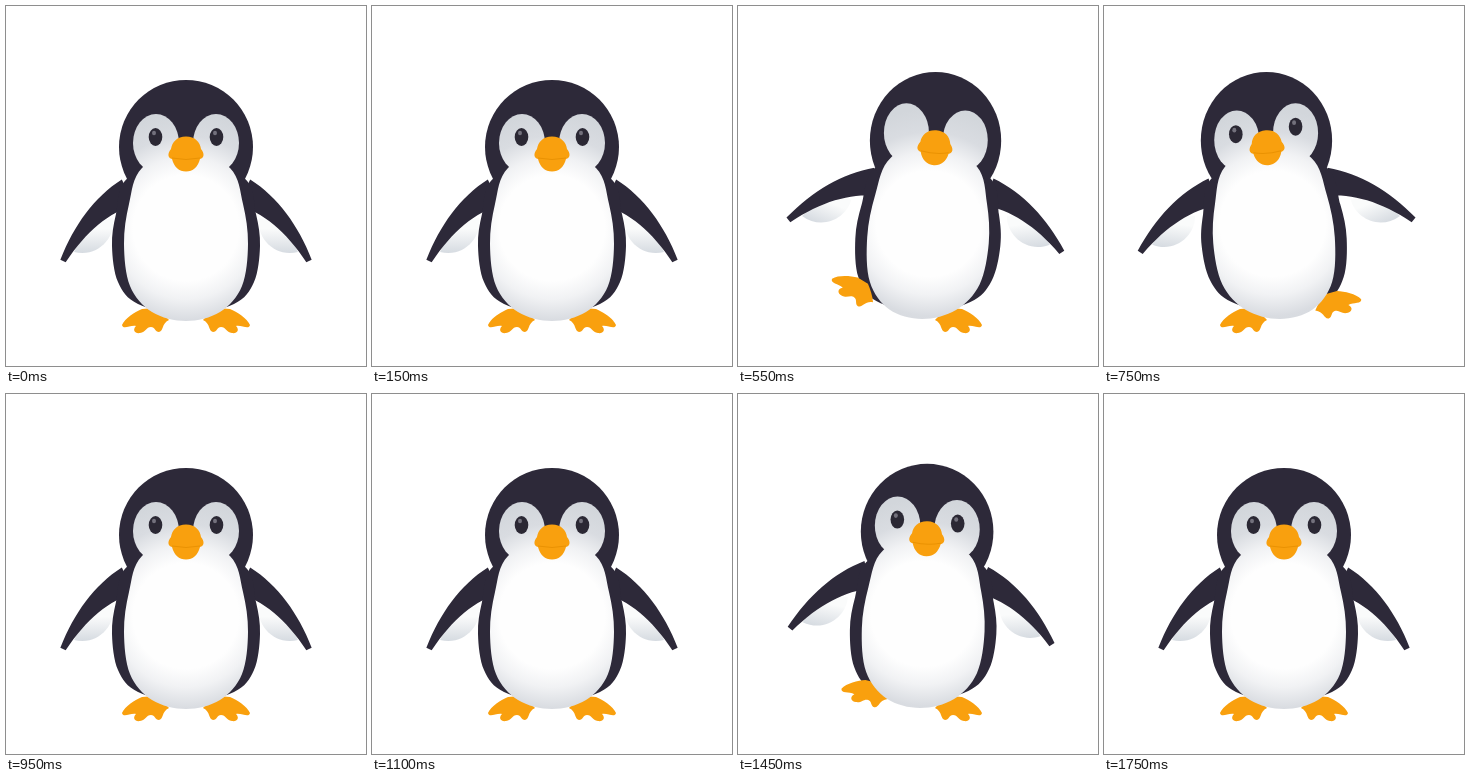
An HTML page for the animation above (1.8 s loop, 360 px wide and 360 px high).

```html
<!DOCTYPE html>
<html lang="en">
<head>
<meta charset="utf-8">
<title>Waddling penguin</title>
<style>
  html, body { margin: 0; width: 100%; height: 100%; overflow: hidden; background: #fff; }
  svg { display: block; width: 100vw; height: 100vh; }
</style>
</head>
<body>
<svg viewBox="0 0 360 360">
  <defs>
    <radialGradient id="chest" gradientUnits="userSpaceOnUse" r="115">
      <stop offset=".46" stop-color="#fefefe"/>
      <stop offset=".62" stop-color="#f1f2f4"/>
      <stop offset=".8" stop-color="#d9dce1"/>
      <stop offset="1" stop-color="#d2d6db"/>
    </radialGradient>
    <linearGradient id="lining" x1="0" y1="0" x2="0" y2="1">
      <stop offset=".3" stop-color="#fafbfb"/>
      <stop offset="1" stop-color="#d6dbe1"/>
    </linearGradient>
  </defs>
  <g id="scene"></g>
</svg>
<script>
const LOOP = 1800, STEP = 50, MID = 180, GROUND = 315;
const DARK = '#2d2939', ORANGE = '#f9a00e';
const SIDES = [1, -1]; // left, right

// Left halves of the symmetric outlines, from top to bottom.
const TORSO = [[180, 150], [122, 172], [110, 208], [106, 240], [112, 276], [132, 298], [180, 309]];
const BELLY = [[180, 140], [136, 162], [123, 198], [118, 238], [124, 280], [146, 306], [180, 315]];

const scene = document.getElementById('scene');
const chest = document.getElementById('chest');

function set(el, attrs) {
  for (const name in attrs) el.setAttribute(name, attrs[name]);
  return el;
}
function add(tag, attrs, parent = scene) {
  const el = document.createElementNS('http://www.w3.org/2000/svg', tag);
  parent.append(el);
  return set(el, attrs);
}
const both = make => SIDES.map(make);

// A tapering band along a quadratic spine that starts at the shoulder.
function wingPath() {
  const top = [], under = [];
  for (let i = 0; i <= 16; i++) {
    const u = i / 16, v = 1 - u;
    const x = -79 * u * v - 65 * u * u, y = 39 * u * v + 69 * u * u;
    const dx = -79 * (v - u) - 130 * u, dy = 39 * (v - u) + 138 * u;
    const w = (14 - 11 * u) / Math.hypot(dx, dy);
    top.push([x + dy * -w, y + dx * w]);
    under.unshift([x + dy * w, y - dx * w]);
  }
  return `M${top.concat(under).join('L')}Z`;
}

const linings = both(() => add('path', {
  d: 'M-15 26C-12 45-30 66-54 60Q-40 28-15 26Z', fill: 'url(#lining)' }));
const wings = both(() => add('path', { d: wingPath(), fill: DARK }));
const torso = add('path', { fill: DARK });
const head = add('ellipse', { fill: DARK });
const feet = both(() => add('path', {
  d: 'M-3-12C-10-9-20-3-23 4C-22 9-15 4-9 5C-13 9-10 13-5 12C1 11 1 6 6 6C10 6 10 11 14 11C19 10 16 3 24-1C20-6 14-10 9-13Z',
  fill: ORANGE }));
const lobes = both(() => add('ellipse', { fill: 'url(#chest)' }));
const belly = add('path', { fill: 'url(#chest)' });
const eyes = both(() => {
  const g = add('g', {});
  add('ellipse', { rx: 6.8, ry: 9, fill: '#2b2834' }, g);
  add('ellipse', { cx: -1.5, cy: -4, rx: 2, ry: 2.3, fill: '#73717c' }, g);
  return g;
});
const beak = add('g', {});
add('path', {
  d: 'M0-17.5C9-17.5 14-12 15-5C19 0 18 4 14 5C12 13 7 17.5 0 17.5C-7 17.5-12 13-14 5C-18 4-19 0-15-5C-14-12-9-17.5 0-17.5Z',
  fill: ORANGE }, beak);
add('path', { d: 'M-14 4Q0 7 14 4', fill: 'none', stroke: '#ea9203' }, beak);

// Closed smooth curve through a half outline and its mirror image.
function outline(half, warp) {
  const twin = half.slice(1, -1).reverse().map(([x, y]) => [2 * MID - x, y]);
  const pts = half.concat(twin).map(p => warp(...p));
  const at = i => pts[(i + pts.length) % pts.length];
  const handle = (i, dir) => at(i).map((v, k) => v + dir * (at(i + 1)[k] - at(i - 1)[k]) / 6);
  return `M${pts[0]}` + pts.map((_, i) =>
    `C${handle(i, 1)} ${handle(i + 1, -1)} ${at(i + 1)}`).join('') + 'Z';
}

// Smooth rise and fall around a moment.
function bump(t, center, reach) {
  const d = Math.abs(t - center) / reach;
  return d < 1 ? Math.cos(d * Math.PI / 2) ** 2 : 0;
}

function draw(t) {
  const lean = bump(t, 550, 150) - bump(t, 750, 190) + 0.52 * bump(t, 1450, 200);
  const crouch = 0.5 * bump(t, 450, 100) + bump(t, 1250, 120);
  const open = 1 - bump(t, 550, 100);
  const size = Math.abs(lean);
  const sx = 1 - 0.02 * size + 0.03 * crouch;
  const sy = 1 + 0.025 * size - 0.021 * crouch;

  // Higher parts sway and tilt more.
  const warp = (x, y) => {
    const h = (GROUND - y) / 180;
    return [
      MID + (x - MID) * sx + lean * (4 + 14 * h) - 2 * crouch * h,
      GROUND - 2 * size - (GROUND - y) * sy + lean * 0.12 * h * (x - MID)
    ];
  };
  const oval = (el, x, y, rx, ry) => {
    const [cx, cy] = warp(x, y);
    set(el, { cx, cy, rx: rx * sx, ry: ry * sy });
  };

  set(torso, { d: outline(TORSO, warp) });
  set(belly, { d: outline(BELLY, warp) });
  oval(head, MID, 141, 67, 67);
  const [cx, cy] = warp(MID, 222);
  set(chest, { cx, cy });

  SIDES.forEach((dir, i) => {
    const raise = 15 * size + 8 * lean * dir + 2 * crouch;
    const arm = `translate(${warp(MID - 58 * dir, 186)}) scale(${dir} 1) rotate(${raise})`;
    set(wings[i], { transform: arm });
    set(linings[i], { transform: arm });

    const lift = Math.max(0, lean * dir) * (dir > 0 ? 1 : 0.55);
    const x = MID - dir * (41 + 24 * lift);
    set(feet[i], {
      transform: `translate(${x} ${GROUND - 32 * lift}) scale(${dir} 1) rotate(${36 * lift})` });

    oval(lobes[i], MID - 30 * dir, 137, 23, 29);
    set(eyes[i], {
      transform: `translate(${warp(MID - 30.5 * dir, 131)}) scale(1 ${open})`,
      visibility: open > 0 ? 'visible' : 'hidden' });
  });
  set(beak, { transform: `translate(${warp(MID, 148)}) rotate(${4 * lean})` });
}

const start = performance.now();
function tick() {
  const t = (performance.now() - start) % LOOP;
  draw(Math.floor(t / STEP) * STEP);
  requestAnimationFrame(tick);
}
tick();
</script>
</body>
</html>
```
